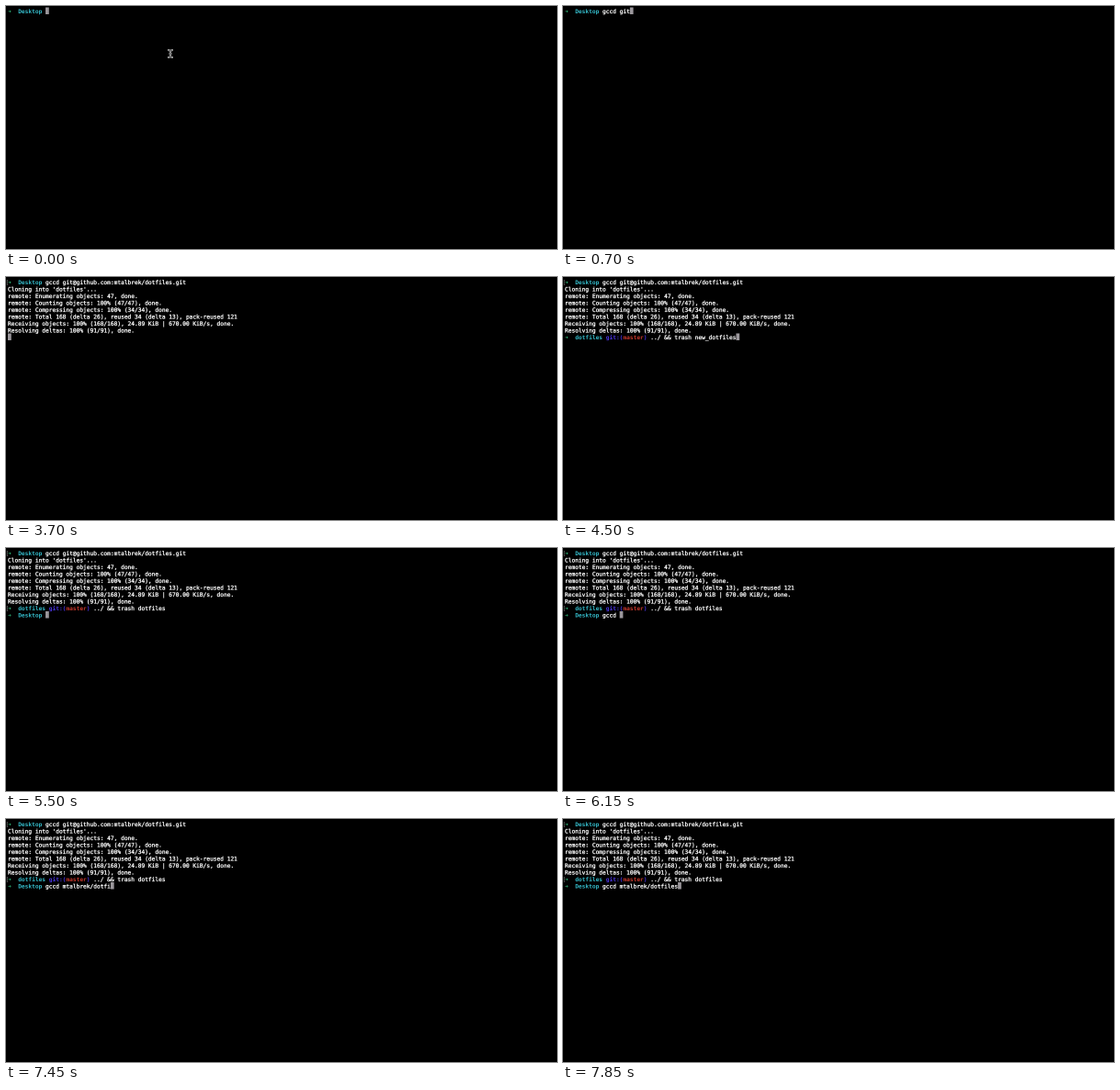
Write an HTML page with a canvas that moves like this. It is 600x265 px and loops after 8 s.

```html
<!DOCTYPE html>
<html lang="en">
<head>
<meta charset="utf-8">
<title>Terminal</title>
<style>
  html, body { margin: 0; width: 100%; height: 100%; overflow: hidden; background: #000; }
  canvas { display: block; width: 600px; height: 265px; }
</style>
</head>
<body>
<canvas width="1200" height="530"></canvas>
<script>
const LOOP = 8000;
const LEFT = 4, TOP = 3, BASELINE = 16, ROW = 15;
const FONT = '12.4px "DejaVu Sans Mono", monospace';
const WHITE = '#fff', GREEN = '#30b878', CYAN = '#35bccb', BLUE = '#4a35e2', RED = '#c8382c';

// Drawn at double size, so rows can sit on half pixels
const ctx = document.querySelector('canvas').getContext('2d');
ctx.font = FONT;
ctx.textRendering = 'geometricPrecision';
ctx.lineWidth = 0.6;
const charWidth = ctx.measureText('0'.repeat(100)).width / 100;

// A line is a list of [text, colour] parts; coloured parts are bold
const plain = text => [[text, WHITE]];
const home = command => [['➜', GREEN], ['  Desktop ', CYAN], [command, WHITE]];
const repo = command => [
  ['➜', GREEN], ['  dotfiles ', CYAN], ['git:(', BLUE], ['master', RED], [') ', BLUE], [command, WHITE]
];
const cloneOutput = [
  'remote: Enumerating objects: 47, done.',
  'remote: Counting objects: 100% (47/47), done.',
  'remote: Compressing objects: 100% (34/34), done.',
  'remote: Total 168 (delta 26), reused 34 (delta 13), pack-reused 121',
  'Receiving objects: 100% (168/168), 24.89 KiB | 670.00 KiB/s, done.',
  'Resolving deltas: 100% (91/91), done.'
].map(plain);

// One key press per listed time
const typed = (text, times, t) => text.slice(0, times.filter(at => at <= t).length);

function cloneCommand(t) {
  return t >= 1050 ? 'gccd git@github.com:mtalbrek/dotfiles.git'
    : typed('gccd git', [100, 150, 250, 300, 400, 500, 600, 700], t);
}

function trashCommand(t) {
  if (t < 4500) return typed('../', [4100, 4150, 4250], t);
  return '../ && trash ' + (t < 5000 ? 'new_' : '') + 'dotfiles';
}

function shortCommand(t) {
  return typed('gccd mtalbrek/dotfiles', [
    5900, 5950, 6000, 6100, 6150,
    6500, 6600, 6650, 6650, 6750, 6850, 6950, 6950, 7050, 7100, 7150, 7200, 7300,
    7350, 7500, 7700, 7850
  ], t);
}

function screen(t) {
  const lines = [home(cloneCommand(t))];
  if (t >= 1600) lines.push(plain("Cloning into 'dotfiles'..."));
  if (t >= 3700) lines.push(...cloneOutput);
  if (t >= 3850) lines.push(repo(trashCommand(t)));
  if (t >= 5500) lines.push(home(shortCommand(t)));
  const waiting = (t >= 1550 && t < 3850) || (t >= 5400 && t < 5500);
  if (waiting) lines.push(plain(''));
  return lines;
}

function drawText(text, x, row, color) {
  const y = BASELINE + row * ROW;
  ctx.fillStyle = ctx.strokeStyle = color;
  ctx.font = (color === WHITE ? '' : 'bold ') + FONT;
  ctx.fillText(text, x, y);
  if (color === WHITE) ctx.strokeText(text, x, y);
}

// Returns the x where the line ends
function drawLine(line, row) {
  let x = LEFT;
  for (const [text, color] of line) {
    drawText(text, x, row, color);
    x += text.length * charWidth;
  }
  return x;
}

function drawMark(row) {
  ctx.font = FONT;
  ctx.fillStyle = '#808080';
  ctx.fillText('[', LEFT - 5, BASELINE + row * ROW);
}

const beam = new Path2D('M-6-8Q0-8 0-4V4Q0 8-6 8M6-8Q0-8 0-4V4Q0 8 6 8M-3 0H3');
function drawMouse(x, y) {
  ctx.save();
  ctx.translate(x, y);
  for (const [color, width] of [['#b8b8b8', 4], ['#333', 1.2]]) {
    ctx.strokeStyle = color;
    ctx.lineWidth = width;
    ctx.stroke(beam);
  }
  ctx.restore();
}

function draw(t) {
  ctx.fillStyle = '#000';
  ctx.fillRect(0, 0, 1200, 530);
  const lines = screen(t);
  const ends = lines.map(drawLine);
  if (t >= 1550) drawMark(0);
  if (t >= 5400) drawMark(8);
  ctx.fillStyle = '#9b979c';
  ctx.fillRect(ends.at(-1), TOP + (lines.length - 1) * ROW, charWidth, ROW);
  if (t < 100) drawMouse(358, 104);
}

const start = performance.now();
function tick() {
  draw((performance.now() - start) % LOOP);
  requestAnimationFrame(tick);
}
tick();
</script>
</body>
</html>
```
